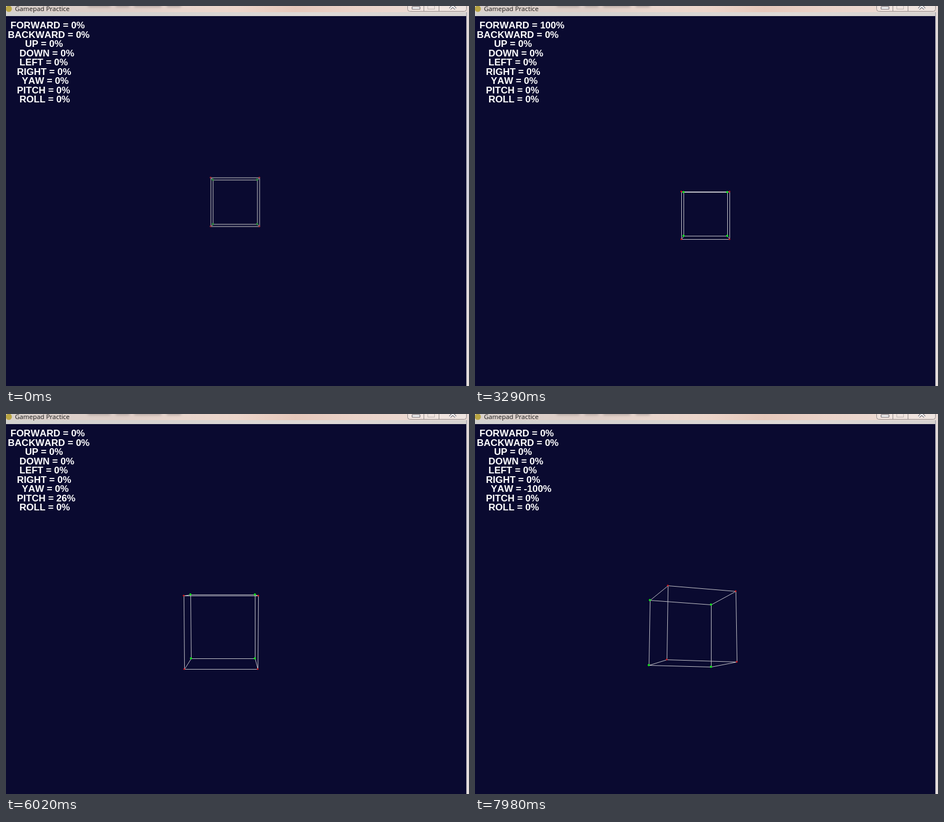
Recreate the animation shown at these times as an HTML page with a canvas. Size 826 px wide and 678 px high, loop 8000 ms.

```html
<!DOCTYPE html>
<html lang="en">
<head>
<meta charset="utf-8">
<title>Gamepad Practice</title>
<style>
  html, body { margin: 0; width: 100%; height: 100%; overflow: hidden; background: #0a0a30; }
  canvas { display: block; }
</style>
</head>
<body>
<canvas id="stage" width="826" height="678"></canvas>
<script>
const ctx = document.getElementById('stage').getContext('2d');
const LOOP = 8000, STEP = 70;
const MOVE = 0.32, DOLLY = 0.325, TURN = 9 * Math.PI / 180;
const FOCAL = 860, CX = 408.7, CY = 349.7, START_DEPTH = 20.75;

// Readout labels with the left edge of each line
const LABELS = {
  FORWARD: 8, BACKWARD: 3.3, UP: 34, DOWN: 24, LEFT: 24,
  RIGHT: 19.5, YAW: 28.3, PITCH: 19.5, ROLL: 24
};

const hold = (level, count) => Array(count).fill(level);

// Stick input: label, first step, level at each following step
const INPUT = [
  ['UP', 7, [0.4, ...hold(1, 7), 0.7]],
  ['DOWN', 18, [0.3, 0.93, ...hold(0.99, 8), 0.73]],
  ['LEFT', 31, [0.5, ...hold(1, 5), 0.5]],
  ['RIGHT', 38, [0.5, ...hold(0.99, 5), 0.75]],
  ['FORWARD', 47, [...hold(1, 7), 0.5]],
  ['RIGHT', 54, [0.8, 0.82]],
  ['BACKWARD', 55, [0.4, ...hold(0.99, 28)]],
  ['LEFT', 65, [0.4, ...hold(0.7, 4), 0.6, 0.5, 0.4, 0.2]],
  ['RIGHT', 75, [0.12, 0.3, 0.25, 0.2, 0.2, 0.15, 0.15, 0.19, 0.35]],
  ['PITCH', 86, [0.26, ...hold(0.99, 4)]],
  ['PITCH', 93, [-0.3, ...hold(-1, 8)]],
  ['PITCH', 104, [0.3, 0.99, 0.99, 0.58]],
  ['YAW', 112, [-0.2, -1, -1]]
];

// Current level and accumulated travel of every control at a step
function readInput(step) {
  const now = {}, sum = {};
  for (const label in LABELS) now[label] = sum[label] = 0;
  for (const [label, first, levels] of INPUT) {
    levels.forEach((level, i) => {
      if (first + i <= step) sum[label] += level;
      if (first + i === step) now[label] = level;
    });
  }
  return { now, sum };
}

function gradient(x, y, stops) {
  const g = ctx.createLinearGradient(0, 0, x, y);
  stops.forEach((color, i) => g.addColorStop(i / (stops.length - 1), color));
  return g;
}

function rect(x, y, w, h, fill) {
  ctx.fillStyle = fill;
  ctx.fillRect(x, y, w, h);
}

function line(a, b) {
  ctx.beginPath();
  ctx.moveTo(...a);
  ctx.lineTo(...b);
  ctx.stroke();
}

function dot(x, y, r, fill) {
  ctx.fillStyle = fill;
  ctx.beginPath();
  ctx.arc(x, y, r, 0, 7);
  ctx.fill();
}

function drawWindow() {
  rect(0, 0, 826, 678, '#0a0a30');
  rect(0, 0, 826, 12, gradient(826, 0,
    ['#d9d1cc', '#dccfc9', '#dfcec7', '#e9d6cd', '#ecd5ca', '#e6c8bb', '#ead2c8', '#ecd9d1', '#e8dad5']));
  rect(0, 11, 826, 7, gradient(826, 0, ['#d2d2d0', '#d6d3d0', '#dedad6', '#d6d2d0']));

  // Soft shapes showing through the glass
  ctx.save();
  ctx.filter = 'blur(2px)';
  for (const [x, w] of [[146, 40], [196, 24], [229, 48], [287, 25]]) rect(x, -3, w, 5, '#b5a7a2');
  ctx.restore();

  rect(821, 11, 1, 667, '#9a9aa6');
  rect(822, 11, 4, 667, gradient(0, 678, ['#e2d8d6', '#d8d4da', '#d4d2dc', '#e4dcdc', '#e6dedc']));

  dot(5, 5, 5.5, '#b9a544');
  ctx.font = '11.5px "Open Sans", "Noto Sans", sans-serif';
  ctx.fillStyle = '#1c1a1a';
  ctx.fillText('Gamepad Practice', 16, 9);

  ctx.lineWidth = 1;
  ctx.strokeStyle = '#918a8a';
  ctx.fillStyle = 'rgba(255,255,255,.25)';
  ctx.beginPath();
  ctx.roundRect(716.5, -8, 105, 17.5, 4);
  ctx.fill();
  ctx.stroke();
  line([745.5, 0], [745.5, 9]);
  line([772.5, 0], [772.5, 9]);

  ctx.strokeStyle = '#66636b';
  rect(724, 1, 15, 5, '#fff');
  ctx.strokeRect(724.5, 1.5, 14, 4);
  ctx.strokeStyle = '#bdb5b3';
  ctx.strokeRect(752.5, -4.5, 12, 10);
  for (const [color, width] of [['#66636b', 4.5], ['#fff', 2.3]]) {
    ctx.strokeStyle = color;
    ctx.lineWidth = width;
    line([792, 5], [799, -2]);
    line([802, 5], [795, -2]);
  }
}

function drawReadout(now) {
  ctx.font = 'bold 17px "Liberation Sans", Arial, sans-serif';
  ctx.fontKerning = 'none';
  ctx.fillStyle = '#fff';
  Object.keys(LABELS).forEach((label, i) => {
    const percent = Math.round(now[label] * 100);
    ctx.fillText(`${label} = ${percent}%`, LABELS[label], Math.floor(28.5 + 16.55 * i) + 12);
  });
  ctx.fontKerning = 'auto';
}

function drawCube(sum, dim) {
  const px = (sum.RIGHT - sum.LEFT) * MOVE;
  const py = (sum.DOWN - sum.UP) * MOVE;
  const pz = START_DEPTH + (sum.FORWARD - sum.BACKWARD) * DOLLY;
  const yaw = -sum.YAW * TURN, pitch = -sum.PITCH * TURN;
  const cy = Math.cos(yaw), sy = Math.sin(yaw);
  const cp = Math.cos(pitch), sp = Math.sin(pitch);

  // Bits of the index choose the side along x, y and z
  const points = Array.from({ length: 8 }, (_, i) => {
    const x = i & 1 ? 1 : -1, y = i & 2 ? 1 : -1, z = i & 4 ? 1 : -1;
    const turned = x * sy + z * cy;
    const scale = FOCAL / (pz - y * sp + turned * cp);
    return [
      Math.floor(CX + (px + x * cy - z * sy) * scale) + 0.5,
      Math.floor(CY + (py + y * cp + turned * sp) * scale) + 0.5
    ];
  });

  ctx.strokeStyle = dim ? '#8f8f9b' : '#c2c2c8';
  ctx.lineWidth = dim ? 1.4 : 1;
  for (let i = 0; i < 8; i++) {
    for (const bit of [1, 2, 4]) if (!(i & bit)) line(points[i], points[i | bit]);
  }
  points.forEach(([x, y], i) => {
    const far = i & 4;
    const color = far ? (dim ? '#2b8a3c' : '#14e61e') : (dim ? '#a82a34' : '#d0161c');
    dot(x - 0.5, y - 0.5, far ? 1.9 : 1.6, color);
  });
}

function draw(time) {
  const step = Math.floor(time % LOOP / STEP);
  const { now, sum } = readInput(step);
  drawWindow();
  drawReadout(now);
  drawCube(sum, step < 7);
  requestAnimationFrame(draw);
}
requestAnimationFrame(draw);
</script>
</body>
</html>
```
